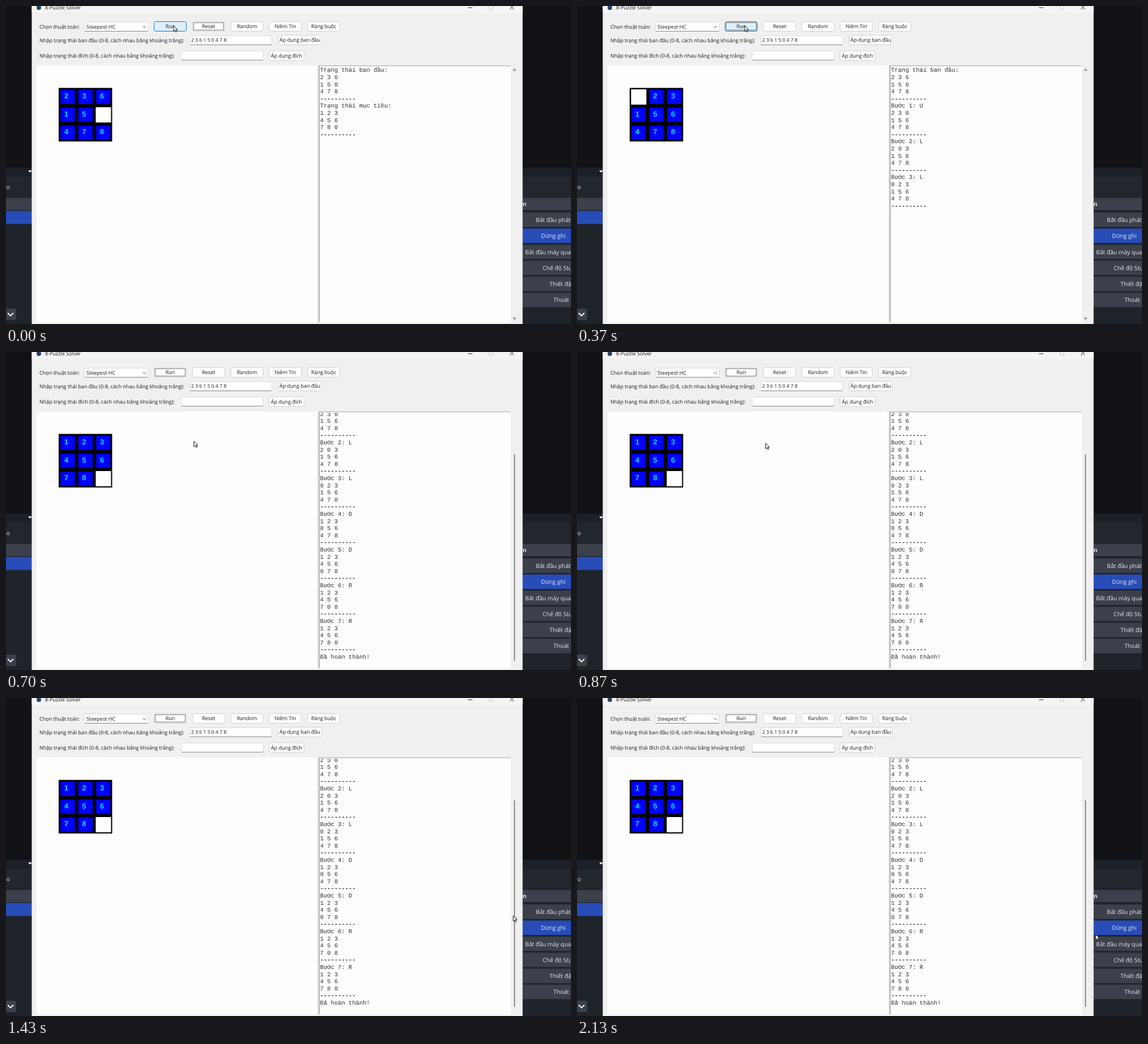
An HTML page that plays this animation: 998x561 px, repeating every 2160 ms.

```html
<!DOCTYPE html>
<html lang="vi">
<head>
<meta charset="utf-8">
<title>8-Puzzle Solver</title>
<style>
  html, body { margin: 0; width: 100%; height: 100%; overflow: hidden; background: #111215; }
  svg { display: block; }
  text { font: 9.05px "Open Sans", "Noto Sans", sans-serif; fill: #1c1c1c; white-space: pre; text-rendering: geometricPrecision; }
  .mid { text-anchor: middle; }
  .dark text { font-size: 10.25px; fill: #e6e7ea; }
  #log text { font: 10.5px "Liberation Mono", "Courier New", monospace; fill: #303030; }
  #log .rule { font-weight: 700; }
  #board text { font: bold 12.8px "Liberation Sans", Arial, sans-serif; fill: #00e8ff; text-anchor: middle; }
</style>
</head>
<body>
<svg id="stage" width="998" height="561" viewBox="0 0 998 561">
  <defs><clipPath id="logClip"><rect x="554" y="107" width="337" height="450"/></clipPath></defs>
  <g id="desk" class="dark"></g>
  <g id="app"></g>
  <g id="board"></g>
  <g clip-path="url(#logClip)"><g id="log"></g></g>
  <g id="bar"></g>
  <g id="arrow"><path d="M0 0V9.6L2.3 7.5L4 11L5.7 10.2L4.1 6.9H7Z" fill="#fff" stroke="#111" stroke-width="1"/></g>
  <g id="beam"><path d="M-3-5H-1L0-4L1-5H3M0-4V4M-3 5H-1L0 4L1 5H3" fill="none" stroke="#111" stroke-width="1.5"/></g>
</svg>
<script>
const $ = id => document.getElementById(id);
const LOOP = 2160, CLICK = 200, STEP = 50, MOVES = "ULLDDRR", LINE = 12.6;

const rect = (x, y, w, h, fill, extra = "") =>
  `<rect x="${x}" y="${y}" width="${w}" height="${h}" fill="${fill}" ${extra}/>`;
const label = (x, y, s, extra = "") => `<text x="${x}" y="${y}" ${extra}>${s}</text>`;
const line = (d, color, width = 1) =>
  `<path d="${d}" fill="none" stroke="${color}" stroke-width="${width}"/>`;

function drawDesk() {
  let s = rect(0, 0, 998, 561, "#1f242b") + rect(0, 0, 998, 285, "#111215")
    + rect(0, 285, 998, 16, "#1c2027") + rect(0, 301, 998, 35, "#22272e")
    + rect(0, 338.5, 998, 21.5, "#3c404b") + rect(0, 361.5, 46, 23, "#284cb8")
    + '<path d="M39 290H46L42.5 294Z" fill="#eee"/>'
    + label(7, 323, "ạo", 'text-anchor="end"')
    + rect(-4, 534, 22, 20, "#3c404b", 'rx="3"') + line("M3 541.5L8 546.5L13 541.5", "#fff", 1.8)
    + label(912.5, 353, "n", 'style="font-weight:700"');
  const items = [[936, "Bắt đầu phát sóng"], [945, "Dừng ghi"], [917, "Bắt đầu máy quay ảo"],
    [948, "Chế độ Studio"], [960, "Thiết đặt"], [967, "Thoát"]];
  items.forEach(([x, name], i) => {
    const y = 364.3 + i * 28.3;
    s += rect(900, y, 110, 25.4, i === 1 ? "#284cb8" : "#3c404b", 'rx="3"')
      + label(x, y + 16.6, name);
  });
  $("desk").innerHTML = s;
}

function button(x, y, w, h, name, id = "") {
  return rect(x + .5, y + .5, w - 1, h - 1, "#fdfdfd", `rx="3" stroke="#d0d0d0" id="${id}"`)
    + rect(x + 2.5, y + 2.5, w - 5, h - 5, "none", `stroke="#666" stroke-width=".9" id="${id}Focus" visibility="hidden"`)
    + label(x + w / 2, y + h / 2 + 3.3, name, 'class="mid"');
}

const entry = (x, y, w, h) => rect(x + .5, y + .5, w - 1, h - 1, "#fff", 'rx="2" stroke="#dadada"')
  + line(`M${x + 1} ${y + h - .5}H${x + w - 1}`, "#868686");

function drawApp() {
  let s = rect(45.5, -5, 867, 570, "#f0f0f0") + rect(45.5, -5, 867, 17, "#f4f4f4")
    + '<circle cx="58" cy="3" r="4" fill="#26436f"/>' + label(69, 5.6, "8-Puzzle Solver")
    + line("M816 3H824", "#222") + line("M853.5-1H860V6H853.5Z", "#c4c4c4")
    + line("M890-1L897 6M897-1L890 6", "#222")
    + label(59, 39.5, "Chọn thuật toán:")
    + entry(138, 28, 114, 17) + label(142, 39.5, "Steepest HC") + line("M241.5 35.5L244.5 38.5L247.5 35.5", "#555")
    + label(59, 63.5, "Nhập trạng thái ban đầu (0-8, cách nhau bằng khoảng trắng):")
    + entry(324, 52, 146, 17) + label(327, 63.3, "2 3 6 1 5 0 4 7 8", 'style="font-size:8.65px"')
    + label(59, 91, "Nhập trạng thái đích (0-8, cách nhau bằng khoảng trắng):")
    + entry(309, 79, 146, 17)
    + button(480, 51, 78, 18, "Áp dụng ban đầu") + button(464, 78.5, 63, 18, "Áp dụng đích");
  ["Run", "Reset", "Random", "Niềm Tin", "Ràng buộc"].forEach((name, i) => {
    s += button(261 + i * 67.8, 27, 58, 18, name, name.split(" ")[0]);
  });
  s += rect(54, 105, 495, 453, "#fdfdfd") + rect(552, 105, 339.5, 453, "#fdfdfd")
    + line("M553 105V558", "#858585", 1.3) + line("M553 105.5H891", "#a4a4a4");
  $("app").innerHTML = s;
}

// Board states from sliding the blank along the moves.
const boards = [[2, 3, 6, 1, 5, 0, 4, 7, 8]];
for (const m of MOVES) {
  const b = [...boards.at(-1)], from = b.indexOf(0);
  const to = from + { U: -3, D: 3, L: -1, R: 1 }[m];
  [b[from], b[to]] = [b[to], 0];
  boards.push(b);
}

const block = (title, b) =>
  [title, ...[0, 3, 6].map(i => b.slice(i, i + 3).join(" ")), "-".repeat(10)];

function logLines(step) {
  const rows = block("Trạng thái ban đầu:", boards[0]);
  if (step < 0) return rows.concat(block("Trạng thái mục tiêu:", boards.at(-1)));
  for (let i = 1; i <= Math.min(step, MOVES.length); i++)
    rows.push(...block(`Bước ${i}: ${MOVES[i - 1]}`, boards[i]));
  if (step > MOVES.length) rows.push("Đã hoàn thành!");
  return rows;
}

function drawBoard(b) {
  $("board").innerHTML = rect(93, 144.5, 94.5, 94.5, "#000") + b.map((n, i) => {
    const x = 93 + i % 3 * 31.5, y = 144.5 + Math.floor(i / 3) * 31.5;
    return n ? rect(x + 3.3, y + 3.3, 25.2, 25.2, "#00f") + label(x + 13.5, y + 18.7, n)
      : rect(x + 2.5, y + 2.5, 27, 27, "#fff");
  }).join("");
}

function drawLog(rows) {
  const shift = Math.max(0, (rows.length - 1) * LINE - 424.5);
  $("log").innerHTML = rows.map((s, i) =>
    label(554.7, (116.4 + i * LINE - shift).toFixed(2), s, s[0] === "-" ? 'class="rule"' : "")).join("");
  const top = 116 + 427 * shift / ((rows.length + 1) * LINE);
  $("bar").innerHTML = shift
    ? rect(897.3, top, 1.8, 545 - top, "#808080", 'rx=".9"')
    : '<path d="M894.5 114.5L898.3 109.5L902 114.5ZM894.5 549.5L898.3 554.5L902 549.5Z" fill="#a3a3a3"/>';
}

// Pointer stops: time, x, y
const path = [[0, 296, 35], [430, 296, 35], [570, 312.5, 89], [720, 333, 161], [930, 333, 161],
  [1330, 896, 384], [1530, 896, 384], [1700, 854, 386], [1900, 854, 386], [2130, 916, 417], [2160, 916, 417]];

function pointer(t) {
  const i = path.findIndex((p, k) => k && t < p[0]);
  const [t0, x0, y0] = path[i - 1], [t1, x1, y1] = path[i];
  const u = (t - t0) / (t1 - t0), e = u * u * (3 - 2 * u);
  return [x0 + (x1 - x0) * e, y0 + (y1 - y0) * e];
}

const inside = (x, y, [l, t, r, b]) => x >= l && x <= r && y >= t && y <= b;
const textAreas = [[324, 52, 470, 69], [309, 79, 455, 96], [553, 106, 891, 558]];

function snap(t) {
  const r = t % 100;
  return t - r + (r >= 70 ? 70 : r >= 30 ? 30 : 0);
}

let shown = null;
function render(now) {
  const t = snap(now % LOOP);
  const step = t < CLICK ? -1 : Math.min(MOVES.length + 1, Math.floor((t - CLICK) / STEP));
  if (step !== shown) {
    shown = step;
    drawBoard(boards[Math.max(0, Math.min(step, MOVES.length))]);
    drawLog(logLines(step));
    $("RunFocus").setAttribute("visibility", step < 0 ? "hidden" : "visible");
    $("ResetFocus").setAttribute("visibility", step < 0 ? "visible" : "hidden");
  }
  const [x, y] = pointer(t);
  const hover = inside(x, y, [261, 27, 319, 45]);
  $("Run").setAttribute("fill", hover ? "#e0eef9" : "#fdfdfd");
  $("Run").setAttribute("stroke", hover ? "#0078d4" : "#d0d0d0");
  const typing = textAreas.some(a => inside(x, y, a));
  for (const [id, on] of [["beam", typing], ["arrow", !typing]]) {
    $(id).setAttribute("transform", `translate(${x.toFixed(1)} ${y.toFixed(1)})`);
    $(id).setAttribute("visibility", on ? "visible" : "hidden");
  }
}

drawDesk();
drawApp();
const start = performance.now();
function tick() {
  render(performance.now() - start);
  requestAnimationFrame(tick);
}
tick();
</script>
</body>
</html>
```
